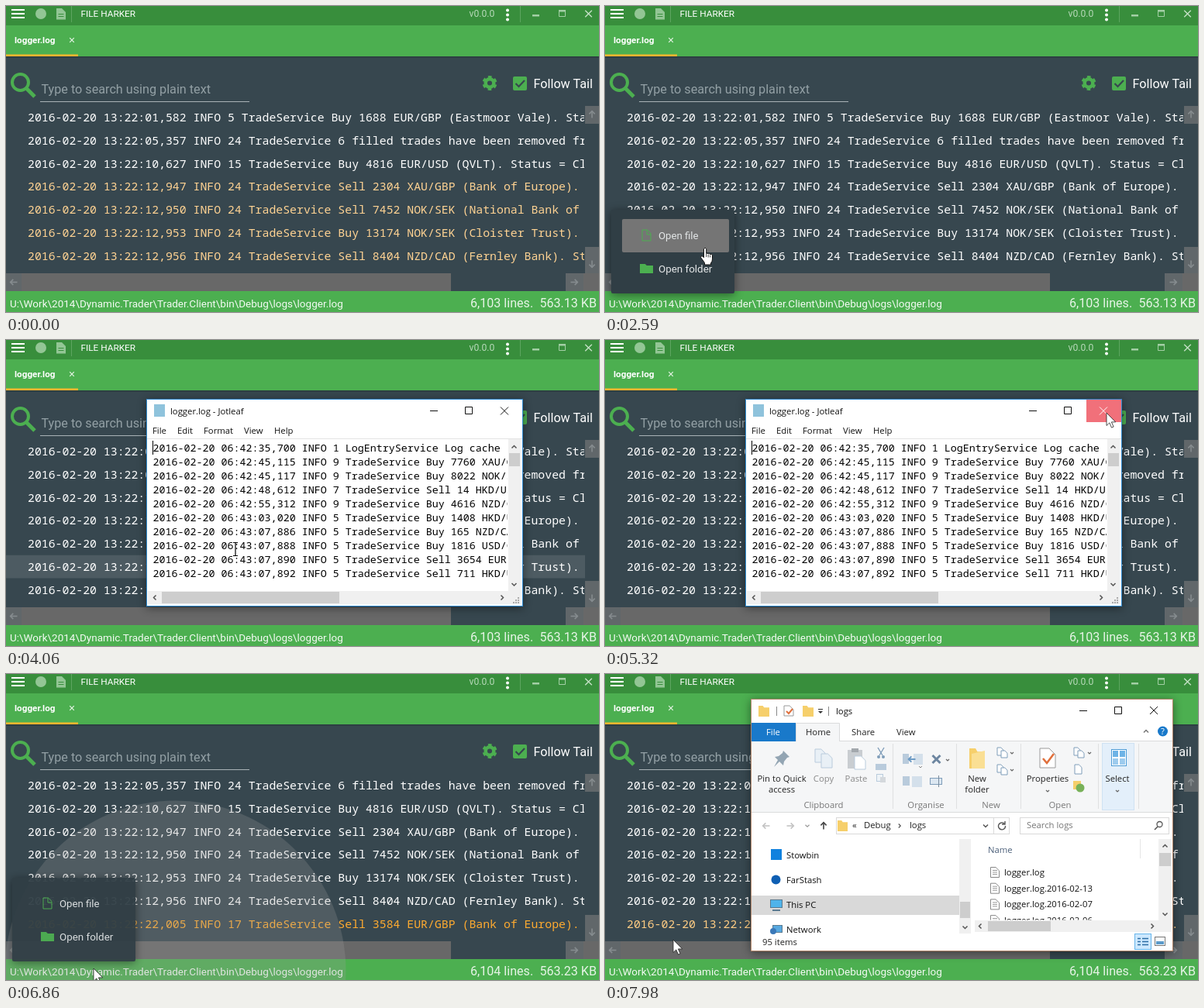
An HTML page for the animation above (8 s loop, 765 by 395 pixels).

```html
<!DOCTYPE html>
<html lang="en">
<head>
<meta charset="utf-8">
<title>Log viewer</title>
<style>
html, body { margin: 0; width: 100%; height: 100%; overflow: hidden; background: #37474f; }
svg { display: block; width: 765px; height: 395px; }
text { white-space: pre; }
.ui { font-family: Roboto, sans-serif; }
.win { font-family: "Open Sans", sans-serif; font-size: 11.3px; }
.mono { font-family: "Noto Sans Mono", monospace; }
.shadow { filter: drop-shadow(0 2px 6px rgba(0, 0, 0, .45)); }
</style>
</head>
<body>
<svg id="stage" viewBox="0 0 765 395" xmlns="http://www.w3.org/2000/svg"></svg>
<script>
const LOOP = 8000, STEP = 70, ROW_H = 29.75, LIST_TOP = 129;
const GREEN = '#4caf50';

const rect = (x, y, w, h, fill, more = '') =>
  `<rect x="${x}" y="${y}" width="${w}" height="${h}" fill="${fill}" ${more}/>`;
const box = (x, y, w, h, fill, stroke) =>
  rect(x + .5, y + .5, w - 1, h - 1, fill, `stroke="${stroke}"`);
const text = (x, y, s, fill, size, more = '') =>
  `<text x="${x}" y="${y}" fill="${fill}" ${size ? `font-size="${size}"` : ''} ${more}>${s}</text>`;
const mid = (x, y, s, fill = '#222') => text(x, y, s, fill, 0, 'text-anchor="middle"');
const line = (d, stroke, w = 1, more = '') =>
  `<path d="${d}" fill="none" stroke="${stroke}" stroke-width="${w}" ${more}/>`;
const shape = (d, fill, more = '') => `<path d="${d}" fill="${fill}" ${more}/>`;
const disc = (x, y, r, fill) => `<circle cx="${x}" cy="${y}" r="${r}" fill="${fill}"/>`;
const group = (id, body, more = '') => `<g id="${id}" ${more}>${body}</g>`;
const clip = (id, x, y, w, h) => `<clipPath id="${id}">${rect(x, y, w, h, '#000')}</clipPath>`;

// chevrons: dx, dy give the pointing direction
const chevron = (x, y, dx, dy, color = '#555', w = 1.5, r = 3) => line(
  dx ? `M${x - dx * r / 2} ${y - r}l${dx * r} ${r}l${-dx * r} ${r}`
     : `M${x - r} ${y - dy * r / 2}l${r} ${dy * r}l${r} ${-dy * r}`, color, w);
const arrow = (x, y, dx, dy, color, w = 1.6, r = 4.5) =>
  line(`M${x - dx * r} ${y - dy * r}L${x + dx * r} ${y + dy * r}`, color, w) +
  chevron(x + dx * r * .55, y + dy * r * .55, dx, dy, color, w, r * .8);
const cross = (x, y, r, color, w = 1) =>
  line(`M${x - r} ${y - r}l${2 * r} ${2 * r}M${x + r} ${y - r}l${-2 * r} ${2 * r}`, color, w);
const folder = (x, y, w, h, fill) =>
  shape(`M${x} ${y}h${w * .4}l${w * .12} ${h * .16}h${w * .48}v${h * .84}h${-w}z`, fill);
const page = (x, y, w, h, stroke, fill = 'none') =>
  `<path d="M${x} ${y}h${w * .6}l${w * .4} ${w * .4}v${h - w * .4}h${-w}z" fill="${fill}" stroke="${stroke}"/>`;

const TRADES = [
  '01,582 INFO 5 TradeService Buy 1688 EUR/GBP (Eastmoor Vale). Status =',
  '05,357 INFO 24 TradeService 6 filled trades have been removed from',
  '10,627 INFO 15 TradeService Buy 4816 EUR/USD (QVLT). Status = Closed',
  '12,947 INFO 24 TradeService Sell 2304 XAU/GBP (Bank of Europe). Status',
  '12,950 INFO 24 TradeService Sell 7452 NOK/SEK (National Bank of Europe',
  '12,953 INFO 24 TradeService Buy 13174 NOK/SEK (Cloister Trust). Status',
  '12,956 INFO 24 TradeService Sell 8404 NZD/CAD (Fernley Bank). Status',
  '22,005 INFO 17 TradeService Sell 3584 EUR/GBP (Bank of Europe). Status'
].map(s => '2016-02-20 13:22:' + s);

const NOTES = [
  '2:35,700 INFO 1 LogEntryService Log cache',
  '2:45,115 INFO 9 TradeService Buy 7760 XAU/GBP',
  '2:45,117 INFO 9 TradeService Buy 8022 NOK/SEK',
  '2:48,612 INFO 7 TradeService Sell 14 HKD/USD',
  '2:55,312 INFO 9 TradeService Buy 4616 NZD/CAD',
  '3:03,020 INFO 5 TradeService Buy 1408 HKD/USD',
  '3:07,886 INFO 5 TradeService Buy 165 NZD/CAD',
  '3:07,888 INFO 5 TradeService Buy 1816 USD/CAD',
  '3:07,890 INFO 5 TradeService Sell 3654 EUR/USD',
  '3:07,892 INFO 5 TradeService Sell 711 HKD/USD'
].map(s => '2016-02-20 06:4' + s);

function header() {
  const dim = '#a3cfa5';
  return rect(0, 0, 765, 25, '#388e3c') + rect(0, 25, 765, 40, GREEN) +
    rect(0, 65, 765, 2, '#2d3f43') +
    line('M7 5h17M7 10h17M7 15h17', '#fff', 2) +
    disc(45, 10, 7, '#93c695') +
    shape('M65 3h7l5 5v9.5h-12z', '#93c695') + line('M67.5 10.5h7M67.5 13.5h7', '#388e3c') +
    line('M84.5 0v21M663.5 0v21', '#5da560') +
    text(96.5, 14, 'FILE HARKER', '#fff', 11.8) + text(597.5, 14, 'v0.0.0', '#b7d9b9', 12.2) +
    [5, 11, 17].map(y => disc(647, y + .5, 2, '#fff')).join('') +
    rect(679, 11, 9, 2.5, dim) + line('M713.5 13.5v-7h8v7z', dim) + rect(713, 5, 9, 2.5, dim) +
    cross(751.5, 10, 4.3, '#c3e0c4', 1.4) +
    text(11, 48, 'logger.log', '#fff', 11.7, 'font-weight="700"') + cross(85, 44, 2.8, '#e5f3e5', 1.2) +
    rect(0, 62.5, 93, 2.5, '#ffb52e');
}

function toolbar() {
  return `<circle cx="18.5" cy="98.5" r="10.5" fill="none" stroke="${GREEN}" stroke-width="4"/>` +
    line('M26 106L37 117', GREEN, 5) +
    text(45.5, 113, 'Type to search using plain text', '#93a0a5', 16.2) + rect(44, 123, 270, 1, '#a9b3b7') +
    `<g fill="none" stroke="${GREEN}"><circle cx="624" cy="99.5" r="5.3" stroke-width="4.5"/>` +
    `<circle cx="624" cy="99.5" r="8" stroke-width="3" stroke-dasharray="4.5 3.878" stroke-dashoffset="-1.94"/></g>` +
    rect(654, 91, 18, 18, GREEN, 'rx="2"') + line('M657.5 100l4 4l7.5-8', '#37474f', 2.2) +
    text(680.5, 106, 'Follow Tail', '#fff', 16.2);
}

function scrollbars() {
  const btn = '#61676a', glyph = '#868c8f', grey = '#686868';
  return rect(747, 129, 18, 23, btn) + arrow(756, 140, 0, -1, glyph) +
    rect(747, 311, 18, 34, btn) + arrow(756, 333, 0, 1, glyph) +
    rect(0, 345, 20, 23, btn) + arrow(10, 356.5, -1, 0, glyph) + rect(20, 345, 554, 23, grey) +
    rect(722, 345, 23, 23, btn) + arrow(733, 356.5, 1, 0, glyph) + rect(745, 345, 20, 23, grey);
}

function menu() {
  const item = (id, y) => rect(22, y, 138, 43, '#757575', `id="${id}" rx="2"`);
  return `<g class="shadow">${rect(8, 263, 159, 108, '#303e45', 'rx="2"')}</g>` +
    item('hotFile', 275) + item('hotFolder', 318) +
    `<g clip-path="url(#itemClip)"><circle id="tap" cx="91" cy="297" r="0" fill="#bbb"/></g>` +
    page(48, 289, 11, 14, GREEN) + line('M54 289v6h5', GREEN) + folder(45, 333, 17, 12, GREEN) +
    text(69, 301, 'Open file', '#e3e6e7', 13.2) + text(69, 344, 'Open folder', '#e3e6e7', 13.4);
}

function editor() {
  const bar = '#f0f0f0', thumb = '#cdcdcd';
  const items = [[189, 'File'], [221, 'Edit'], [255, 'Format'], [307, 'View'], [346, 'Help']];
  return `<g class="shadow">${box(181, 76, 486, 268, '#fff', '#2f8ad0')}</g>` +
    rect(191, 83, 14, 16, '#8fc3dc') +
    text(212, 96, 'logger.log - Jotleaf', '#111') +
    rect(621, 77, 45, 29, '#e81123', 'id="closeBtn"') +
    line('M547 91.5h10M592.5 86.5h9v9h-9z', '#111') +
    group('closeX', line('M638 86.5l10 10M648 86.5l-10 10', 'currentColor')) +
    items.map(([x, s]) => text(x, 121, s, '#111')).join('') +
    rect(182, 127, 484, 1, '#e3e3e3') +
    `<g clip-path="url(#noteClip)" class="mono">` +
    NOTES.map((s, i) => text(189.5, 144 + 18 * i, s, '#000', 13.35)).join('') + '</g>' +
    rect(189, 130, 1, 18, '#000', 'id="caret"') +
    rect(648, 128, 16, 196, bar) + rect(649, 146, 14, 17, thumb) +
    chevron(655.5, 138, 0, -1) + chevron(655.5, 315.5, 0, 1) +
    rect(183, 324, 481, 17, bar) + rect(201, 325, 229, 15, thumb) +
    chevron(192, 332.5, -1, 0) + chevron(640, 332.5, 1, 0) +
    line('M654 339h8M657 336h5M660 333h2', '#aaa', 2, 'stroke-dasharray="2 1"');
}

function ribbon() {
  const grey = '#8a8a8a', pale = '#b9cbdc', steel = '#7f9db9';
  const cap = (x, s) => mid(x, 173, s, '#777');
  const small = (x, y) => page(x, y, 8, 10, steel, '#fff') + page(x + 5, y + 4, 8, 9, steel, '#fff');
  return rect(189, 87, 543, 92, '#f5f6f7') + rect(189, 178, 543, 1, '#dadbdc') +
    rect(189, 63, 57, 24, '#1979ca') + text(208, 79, 'File', '#fff') +
    `<path d="M246.5 87v-23.5h56v23.5" fill="#f5f6f7" stroke="#dadbdc"/>` + rect(303, 86, 429, 1, '#dadbdc') +
    text(259, 79, 'Home', '#222') + text(318, 79, 'Share', '#222') + text(376, 79, 'View', '#222') +
    chevron(698, 74, 0, -1, '#777') + disc(719.5, 74, 6.5, '#1979ca') + mid(719.5, 78, '?', '#fff') +
    // clipboard
    shape('M230 99l8 8l-3 1l-4 5l-1 5l-5-5l-7 7l5-9l-4-4l5-1l5-4z', '#93a5b3') +
    mid(228, 139, 'Pin to Quick') + mid(228, 153, 'access') +
    page(271, 97, 13, 17, pale, '#e9f0f6') + page(279, 103, 14, 18, pale, '#e9f0f6') + mid(282, 139, 'Copy', grey) +
    rect(313, 98, 19, 24, '#c9cdd1') + rect(318, 96, 9, 5, '#a3a8ad') + page(322, 106, 14, 17, pale, '#fff') +
    mid(324, 139, 'Paste', grey) +
    line('M352 95l6 10M360 95l-6 10', steel, 1.4) + disc(353, 107, 2, steel) + disc(359, 107, 2, steel) +
    rect(349, 116, 14, 8, pale) + box(350, 129, 9, 10, '#eef3f7', pale) + rect(355, 133, 7, 7, '#d4d8dc') +
    cap(282, 'Clipboard') +
    // organise
    rect(384, 103, 8, 13, pale) + rect(398, 103, 12, 14, '#d4e0eb') + arrow(396, 110, -1, 0, '#6c9bc5', 2) +
    cross(427.5, 110, 5, '#6d86a0', 3) + chevron(442, 111, 0, 1, '#666', 1.2, 2) + chevron(407, 120, 0, 1, '#888', 1, 2) +
    rect(384, 132, 9, 12, pale) + rect(396, 132, 13, 14, '#d4e0eb') +
    box(419, 134, 16, 9, '#dce7f1', steel) + line('M430.5 131v15', '#7a8c9d') + cap(414, 'Organise') +
    // new
    folder(470, 96, 20, 26, '#f6cf6b') + shape('M473 103l17-4v23h-17z', '#fadf94') +
    mid(480, 139, 'New') + mid(480, 153, 'folder') +
    small(506, 95) + chevron(525, 102, 0, 1, '#666', 1.2, 2) + small(506, 117) + chevron(525, 124, 0, 1, '#666', 1.2, 2) +
    cap(498, 'New') +
    // open
    page(561, 96, 20, 25, '#9a9a9a', '#fff') + line('M565 109l5 6l9-12', '#e0703c', 2.6) +
    mid(571, 139, 'Properties') + chevron(571, 151, 0, 1, '#666', 1.2, 2) +
    small(605, 95) + chevron(625, 102, 0, 1, '#666', 1.2, 2) + page(606, 117, 9, 12, steel, '#fff') +
    rect(604, 138, 10, 11, '#f6cf6b') + disc(613, 147, 5.5, '#78b159') + cap(587, 'Open') +
    // select
    box(641, 89, 42, 87, '#e3effa', '#cfe2f3') + box(653, 97, 20, 22, '#fff', '#4b9bd6') +
    [655, 664].map(x => rect(x, 99, 7, 8, '#6db3e6') + rect(x, 109, 7, 8, '#9dcbee')).join('') +
    mid(661, 139, 'Select') + chevron(661, 151, 0, 1, '#666', 1.2, 2) +
    line('M371.5 90v84M453.5 90v84M536.5 90v84M636.5 90v84M688.5 90v84', '#dfe0e1');
}

function explorer() {
  const bar = '#f0f0f0', thumb = '#cdcdcd';
  const files = ['', '.2016-02-13', '.2016-02-07', '.2016-02-06'];
  return `<g class="shadow">${box(188, 32, 545, 326, '#fff', '#b08468')}</g>` +
    folder(198, 41, 14, 14, '#f6cf6b') + page(231, 41, 12, 13, '#999', '#fff') + line('M234 48l3 3l5-6', '#e0703c', 2) +
    folder(255, 41, 14, 14, '#f6cf6b') + line('M221.5 42v12M288.5 42v12', '#888') +
    line('M275 45.5h6', '#333') + shape('M275 48h6l-3 3z', '#333') +
    text(298, 52, 'logs', '#111') + line('M612 47.5h10M657.5 42.5h9v9h-9z', '#111') + cross(708, 47, 5, '#111') +
    ribbon() +
    arrow(208, 196, -1, 0, '#c3c3c3') + arrow(239, 196, 1, 0, '#c3c3c3') +
    chevron(261, 196, 0, 1, '#999', 1.2, 2.5) + arrow(282, 196, 0, -1, '#444') +
    box(298, 185, 224, 22, '#fff', '#d9d9d9') + rect(501, 185, 1, 22, '#d9d9d9') + folder(300, 189, 13, 14, '#f6cf6b') +
    text(319, 199, '«', '#222') + text(334, 199, 'Debug', '#222') + chevron(380, 196, 1, 0, '#555', 1.2, 2.5) +
    text(393, 199, 'logs', '#222') + chevron(491, 196, 0, 1) +
    line('M515 193a4.5 4.5 0 1 0 1.5 3M516 190v4h-4', '#555', 1.4) +
    box(535, 185, 193, 22, '#fff', '#d9d9d9') + text(544, 199, 'Search logs', '#777') +
    `<circle cx="715.5" cy="194" r="3.5" fill="none" stroke="#555" stroke-width="1.3"/>` + line('M713 197l-4 4', '#555', 1.6) +
    // navigation
    rect(189, 286, 268, 25, '#d9d9d9') +
    rect(214, 226, 14, 14, '#1081de') + text(234, 238, 'Stowbin', '#111') +
    disc(220.5, 265.5, 6, '#0f5fb3') + text(234, 270, 'FarStash', '#111') +
    box(213, 291, 16, 11, '#4fb3ea', '#5a7a90') + rect(216, 304, 10, 2, '#5a7a90') + text(234, 302, 'This PC', '#111') +
    box(216, 324, 13, 10, '#58a9e0', '#5a7a90') + disc(217, 332, 4, '#3a78b8') + text(234, 334, 'Network', '#111') +
    rect(457, 213, 15, 122, bar) + rect(458, 294, 13, 21, thumb) + chevron(464.5, 327, 0, 1) +
    // file list
    text(494, 231, 'Name', '#4c607a') + line('M690.5 213v25', '#e5e5e5') +
    '<g clip-path="url(#fileClip)">' + files.map((s, i) => {
      const y = 255.5 + 20.7 * i;
      return page(497.5, y - 6, 11, 13, '#888', '#fff') +
        line(`M500 ${y - 2}h6M500 ${y + .5}h6M500 ${y + 3}h6`, '#999') +
        text(515, y + 4.5, 'logger.log' + s, '#111');
    }).join('') + '</g>' +
    rect(477, 318, 237, 15, bar) + rect(494, 319, 81, 13, thumb) + chevron(484, 325.5, -1, 0) + chevron(706, 325.5, 1, 0) +
    rect(714, 213, 17, 120, bar) + rect(715, 231, 15, 17, thumb) + chevron(722.5, 222, 0, -1) + chevron(722.5, 310, 0, 1) +
    text(203, 350, '95 items', '#222') +
    box(683, 335, 22, 21, '#cce8ff', '#66b5ea') + line('M687 341.5h4M687 345.5h4M687 349.5h4M693 341.5h8M693 345.5h8M693 349.5h8', '#2b6ca3', 1.4) +
    box(709, 339, 14, 12, '#fff', '#777') + rect(711, 345, 10, 4, '#5b9ac9');
}

function cursors() {
  return group('arrow', `<path d="M0 0v16.5l3.8-3.6l2.7 6.2l2.6-1.1l-2.7-6.1h5.3z" fill="#fff" stroke="#222" stroke-width=".8"/>`) +
    group('hand', `<path d="M-1.5 1.5q1.7-2.5 3.2 0v6q1.5-1 2.5.4q1.5-.8 2.5.6q2-.6 2.8 1.3v5q0 3-2 5.2v2h-8v-2.5l-5-7q.2-2.5 2.5-1.5l1.5 1.8z" fill="#fff" stroke="#111" stroke-width="1"/>` +
      line('M1.7 8v4M4.2 9v3.5M6.7 9.5v3', '#111', .8)) +
    group('beam', line('M-3 -8.5h2.5l.5 .5l.5-.5h2.5M-3 8.5h2.5l.5-.5l.5 .5h2.5M0 -8v16', '#000', 1.2));
}

const stage = document.getElementById('stage');
stage.innerHTML = '<defs>' + clip('listClip', 0, 129, 746, 216) + clip('rippleClip', 0, 65, 765, 330) +
  clip('noteClip', 182, 128, 465, 196) + clip('fileClip', 477, 240, 237, 77.5) + clip('itemClip', 22, 275, 138, 86) + '</defs>' +
  rect(0, 0, 765, 395, '#37474f') +
  '<g class="ui">' + header() + toolbar() + '</g>' +
  rect(0, 0, 747, ROW_H, '#4d5b62', 'id="hover"') +
  '<g class="mono" clip-path="url(#listClip)">' +
  Array.from({ length: 7 }, (_, i) => text(28, 149.2 + ROW_H * i, '', '#fff', 14.84, 'class="row"')).join('') + '</g>' +
  scrollbars() +
  '<g class="ui">' + rect(0, 368, 765, 27, GREEN) +
  text(5, 388.5, String.raw`U:\Work\2014\Dynamic.Trader\Trader.Client\bin\Debug\logs\logger.log`, '#f3faf3', 13.53) +
  text(599, 389, '', '#e6f4e6', 16.1, 'id="lines"') + text(762, 389, '', '#e6f4e6', 16.1, 'id="size" text-anchor="end"') +
  '<g clip-path="url(#rippleClip)"><circle id="ripple" cx="218.5" cy="383.5" fill="#9e9e9e"/></g>' +
  group('menu', menu()) + '</g>' +
  group('editor', editor(), 'class="win"') + group('explorer', explorer(), 'class="win"') + cursors();

const $ = id => document.getElementById(id);
const rows = [...document.querySelectorAll('.row')];
const set = (el, attrs) => { for (const k in attrs) el.setAttribute(k, attrs[k]); };
const show = (id, on) => set($(id), { visibility: on ? 'inherit' : 'hidden' });
const ramp = (t, a, b) => Math.min(1, Math.max(0, (t - a) / (b - a)));
const ease = k => 1 - (1 - k) ** 3;
const within = (t, a, b) => t >= a && t < b;

// time, x, y of the pointer tip
const PATH = [
  [490, 240, 400], [1120, 219, 385], [2030, 219, 385], [2520, 129, 312], [3050, 129, 312],
  [3320, 296, 270], [4060, 296, 270], [4800, 647, 94], [5430, 647, 94], [5740, 366, 157],
  [6230, 115, 382], [6440, 113, 380], [6860, 113, 380], [7210, 88, 343]
];

function pointer(t) {
  const i = PATH.findIndex(p => p[0] > t);
  if (i < 0) return PATH[PATH.length - 1].slice(1);
  if (!i) return PATH[0].slice(1);
  const [a, b] = [PATH[i - 1], PATH[i]];
  const k = ramp(t, a[0], b[0]), s = k * k * (3 - 2 * k);
  return [a[1] + (b[1] - a[1]) * s, a[2] + (b[2] - a[2]) * s];
}

const fresh = p => `rgb(255,${Math.round(167 + 88 * p)},${Math.round(38 + 217 * p)})`;

function placeWindow(id, k, cx, cy) {
  show(id, k > 0);
  const s = .92 + .08 * k;
  set($(id), { opacity: k, transform: `translate(${cx} ${cy}) scale(${s}) translate(${-cx} ${-cy})` });
}

function draw(t) {
  const [x, y] = pointer(t);
  const added = t >= 6720 ? 1 : 0;

  rows.forEach((row, i) => {
    const n = i + added;
    row.textContent = TRADES[n];
    const p = n === 7 ? ramp(t, 6720, 9620) : n > 2 ? .5 + .5 * ramp(t, 0, 2000) : 1;
    set(row, { fill: fresh(p) });
  });
  $('lines').textContent = added ? '6,104 lines.' : '6,103 lines.';
  $('size').textContent = added ? '563.23 KB' : '563.13 KB';

  let hot = -1;
  if (within(t, 3080, 4480)) hot = 5;
  else if (within(t, 5530, 6230) && y >= LIST_TOP && y < 337) hot = Math.floor((y - LIST_TOP) / ROW_H);
  show('hover', hot >= 0);
  set($('hover'), { y: LIST_TOP + Math.max(0, hot) * ROW_H });

  const press = t < 6640 ? 1740 : 6640, age = t - press;
  set($('ripple'), { r: Math.min(320, Math.max(0, age)), opacity: .4 * (1 - ramp(age, 0, 550)) });

  const gone = press === 1740 ? 3040 : 7440;
  const menuK = ramp(age, 70, 230) * (1 - ramp(t, gone, gone + 130));
  show('menu', menuK > 0);
  set($('menu'), { opacity: menuK });
  show('hotFile', within(t, 2450, 3200));
  show('hotFolder', within(t, 7100, 7600));
  const tapK = press === 1740 ? ramp(t, 2590, 2870) : 0;
  set($('tap'), { r: 75 * tapK, opacity: .3 * (1 - tapK) });

  placeWindow('editor', ease(ramp(t, 3020, 3300)) * (1 - ramp(t, 5400, 5640)), 424, 210);
  placeWindow('explorer', ease(ramp(t, 7530, 7840)), 460, 195);
  show('caret', !(within(t, 3570, 4060) || within(t, 4550, 4970)));
  const overClose = t >= 4760;
  show('closeBtn', overClose);
  set($('closeBtn'), { fill: t >= 5320 ? '#f1707a' : '#e81123' });
  $('closeX').style.color = overClose ? '#fff' : '#111';

  const kind = within(t, 3220, 4410) ? 'beam'
    : within(t, 490, 3080) || within(t, 7140, 7490) ? 'hand' : 'arrow';
  for (const id of ['arrow', 'hand', 'beam']) {
    show(id, id === kind && t >= 490);
    set($(id), { transform: `translate(${x} ${y})` });
  }
}

const start = performance.now();
function tick(now) {
  const t = Math.max(0, now - start) % LOOP;
  draw(Math.floor(t / STEP) * STEP);
  requestAnimationFrame(tick);
}
draw(0);
requestAnimationFrame(tick);
</script>
</body>
</html>
```
